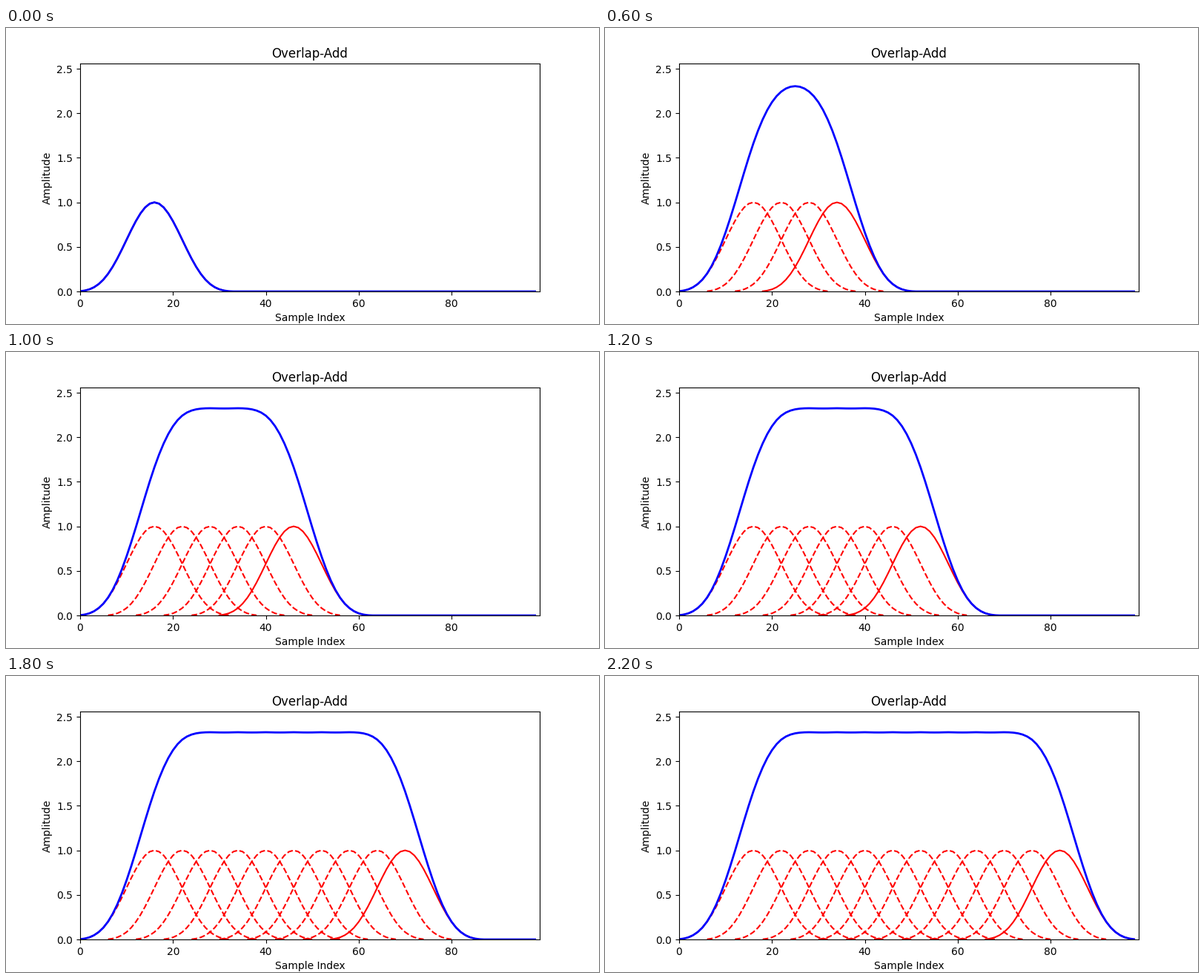
Write a matplotlib script that moves like this. It is 800 px wide and 400 px high and loops after 2400 ms.

```python
import numpy as np
import matplotlib.pyplot as plt
from matplotlib.animation import FuncAnimation

WIN_LEN = 33
HOP = 6
COUNT = 12
LOOP_MS = 2400
TOTAL = WIN_LEN + (COUNT - 1) * HOP

window = np.kaiser(WIN_LEN, 8)
starts = HOP * np.arange(COUNT)

# sums[i] is the signal after adding windows 0..i
parts = np.zeros((COUNT, TOTAL))
for part, start in zip(parts, starts):
    part[start:start + WIN_LEN] = window
sums = np.cumsum(parts, axis=0)

fig, ax = plt.subplots(figsize=(8, 4), dpi=100)
ax.set_xlim(0, TOTAL)
ax.set_ylim(0, 1.1 * sums.max())
ax.set_title("Overlap-Add")
ax.set_xlabel("Sample Index")
ax.set_ylabel("Amplitude")

bumps = [ax.plot(s + np.arange(WIN_LEN), window, color="red")[0] for s in starts]
total, = ax.plot(np.arange(TOTAL), sums[0], color="blue", linewidth=2)


def update(step):
    for i, bump in enumerate(bumps):
        bump.set_visible(i <= step)
        bump.set_linestyle("-" if i == step else "--")
    total.set_ydata(sums[step])
    return [*bumps, total]


anim = FuncAnimation(fig, update, frames=COUNT, interval=LOOP_MS / COUNT,
                     repeat=True, repeat_delay=0, blit=False)
plt.show()
```
